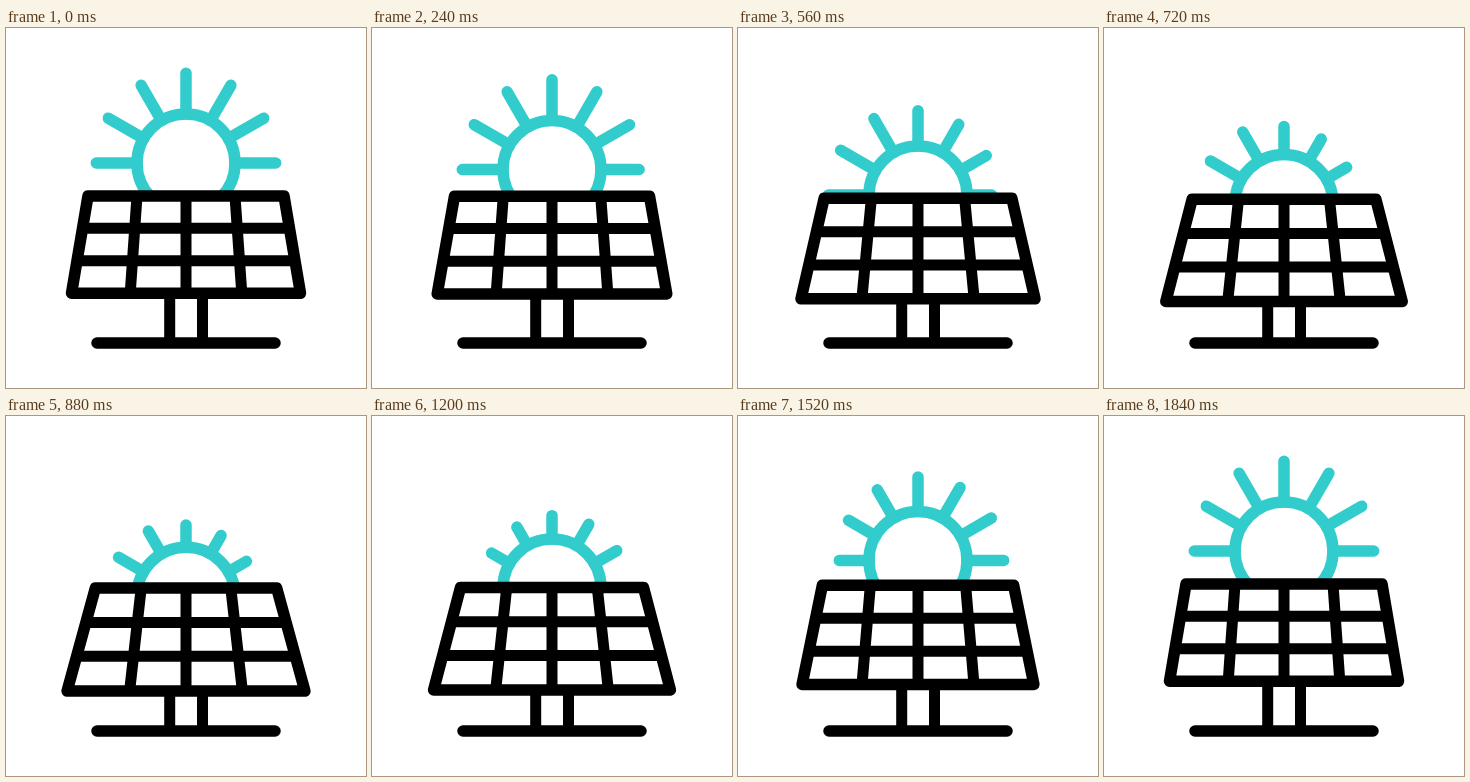
These frames come from a looping animation (360x360 px, 2 s). An HTML page:

```html
<!DOCTYPE html>
<html lang="en">
<head>
<meta charset="utf-8">
<title>Solar panel</title>
<style>
  html, body { margin: 0; width: 100%; height: 100%; overflow: hidden; background: #fff; }
  svg { display: block; width: 100%; height: 100%; }
  path, circle { fill: none; stroke-width: 11.5; stroke-linecap: round; stroke-linejoin: round; }
  #sun { stroke: #33cccc; }
  #stand, #panel { stroke: #000; }
  #panel .frame { fill: #fff; }
  #panel .grid, #stand .legs { stroke-width: 11; stroke-linecap: butt; }
</style>
</head>
<body>
<svg viewBox="0 0 360 360">
  <g id="sun">
    <circle r="49"/>
    <path class="rays"/>
  </g>
  <g id="stand">
    <path class="legs"/>
    <path d="M91 315H269"/>
  </g>
  <g id="panel">
    <path class="frame"/>
    <path class="grid"/>
  </g>
</svg>
<script>
const LOOP = 2000, STEP = 40, END = 1840;
const CX = 180, SUN_Y = 135, RING = 49, RAY = 89.7, SHRINK = 20, RAY_TIME = 680;

// Start of each ray's shrinking, from the right ray round to the left one
const rayStarts = [80, 200, 260, 320, 440, 500, 560];

// Time and drop of the sun
const sunPath = [[80, 0], [400, 18.5], [560, 32], [640, 37], [900, 45.3], [1200, 37], [1520, 9.4], [1800, 0]];

const find = s => document.querySelector(s);
const sun = find('#sun'), rays = find('.rays'), legs = find('.legs');
const frame = find('.frame'), grid = find('.grid');

const clamp = u => Math.min(1, Math.max(0, u));
const ease = u => (1 - Math.cos(Math.PI * clamp(u))) / 2;
const mix = (a, b, u) => a + (b - a) * u;

// Eases from 0 to 1 over a..b and back over c..d
const swing = (t, a, b, c, d) => ease((t - a) / (b - a)) - ease((t - c) / (d - c));

const slope = (p, q) => (q[1] - p[1]) / (q[0] - p[0]);

function tangent(pts, i) {
  if (i === 0 || i === pts.length - 1) return 0;
  const a = slope(pts[i - 1], pts[i]), b = slope(pts[i], pts[i + 1]);
  return a * b > 0 ? 2 * a * b / (a + b) : 0;
}

// Smooth curve through the points without overshoot
function curve(pts, t) {
  const last = pts.length - 1;
  if (t <= pts[0][0]) return pts[0][1];
  if (t >= pts[last][0]) return pts[last][1];
  const i = pts.findIndex(p => p[0] > t) - 1;
  const [t0, y0] = pts[i], [t1, y1] = pts[i + 1];
  const h = t1 - t0, u = (t - t0) / h, v = 1 - u;
  return y0 * (1 + 2 * u) * v * v + y1 * u * u * (3 - 2 * u)
    + h * u * v * (v * tangent(pts, i) - u * tangent(pts, i + 1));
}

function drawSun(t) {
  sun.setAttribute('transform', `translate(${CX} ${SUN_Y + curve(sunPath, t)})`);
  rays.setAttribute('d', rayStarts.map((start, i) => {
    const peak = start + RAY_TIME, a = i * Math.PI / 6;
    const len = RAY - SHRINK * swing(t, start, peak, peak, END);
    const x = Math.cos(a), y = -Math.sin(a);
    return `M${x * RING} ${y * RING}L${x * len} ${y * len}`;
  }).join(''));
}

function drawPanel(t) {
  const p = swing(t, 100, 960, 1000, END);
  const top = mix(168, 172, p), bottom = mix(265.3, 275.3, p);
  const half = mix(98, 90.5, p), base = mix(114.5, 119, p);
  const inTop = mix(49, 44.7, p), inBase = mix(55.8, 56.4, p);
  const bars = [mix(200.2, 206.7, p), mix(232.8, 240.5, p)];
  const edge = y => mix(half, base, (y - top) / (bottom - top));

  frame.setAttribute('d',
    `M${CX - half} ${top}H${CX + half}L${CX + base} ${bottom}H${CX - base}Z`);
  grid.setAttribute('d',
    bars.map(y => `M${CX - edge(y)} ${y}H${CX + edge(y)}`).join('') +
    [-1, 0, 1].map(s => `M${CX + s * inTop} ${top}L${CX + s * inBase} ${bottom}`).join(''));
  legs.setAttribute('d', `M163.7 ${bottom}V315M196.5 ${bottom}V315`);
}

const origin = performance.now();

function tick() {
  const now = Math.max(0, performance.now() - origin) % LOOP;
  let t = Math.floor(now / STEP) * STEP;
  if (t < 120) t = 0;
  drawSun(t);
  drawPanel(t);
  requestAnimationFrame(tick);
}
tick();
</script>
</body>
</html>
```
